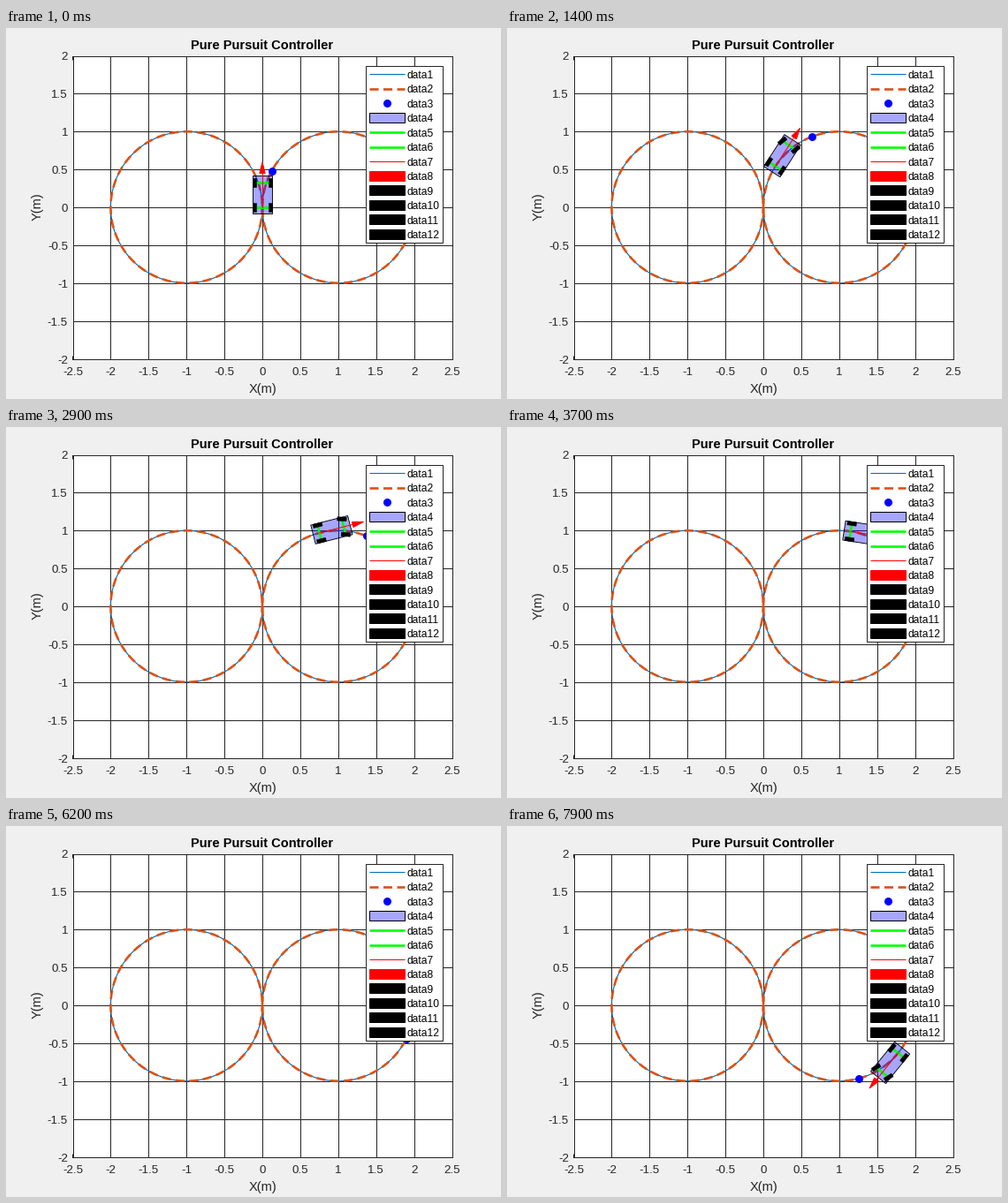
These frames come from a looping animation (560 px wide and 420 px high, 8000 ms). A matplotlib script:

```python
import numpy as np
import matplotlib.pyplot as plt
from matplotlib.animation import FuncAnimation
from matplotlib.patches import Polygon, Rectangle

W, H, DPI = 560, 420, 100
PX = 72 / DPI                       # one pixel in points
FRAMES, INTERVAL = 80, 100
LEFT, RIGHT, TOP, BOTTOM = 75.5, 504.5, 31.5, 374.5

INK = (0.15, 0.15, 0.15)
BLUE, ORANGE = (0, 0.447, 0.741), (0.85, 0.325, 0.098)
GREEN, RED = (0, 1, 0), (1, 0, 0)
BODY, BODY_OPAQUE = (0, 0, 1, 0.35), (0.65, 0.65, 1)
DASH = (0, (3.75, 2.06))

STEP, LOOKAHEAD, LAG = 0.05, 0.5, 2.54   # metres per frame, metres, frames
WHEELBASE, TRACK = 0.33, 0.105
REAR, FRONT, HALF_WIDTH = -0.087, 0.415, 0.128
WHEEL_L, WHEEL_W = 0.12, 0.05
ARROW, HEAD_L, HEAD_W = 0.6, 0.15, 0.075
STEER = -np.arctan(WHEELBASE)

plt.rcParams["font.family"] = "Liberation Sans"
fig = plt.figure(figsize=(W / DPI, H / DPI), dpi=DPI, facecolor=(0.94,) * 3)
ax = fig.add_axes([LEFT / W, 1 - BOTTOM / H, (RIGHT - LEFT) / W, (BOTTOM - TOP) / H])
ax.set(xlim=(-2.5, 2.5), ylim=(-2, 2))
top = fig.add_axes([0, 0, 1, 1], zorder=5)
top.set(xlim=(0, W), ylim=(H, 0))
top.axis("off")


def label(x, y, s, size, **kw):
    kw.setdefault("ha", "center")
    top.text(x, y, s, fontsize=size * PX, va="baseline", **kw)


def draw_axes():
    xs, ys = np.linspace(-2.5, 2.5, 11), np.linspace(-2, 2, 9)
    ax.set_xticks(xs, [""] * len(xs))
    ax.set_yticks(ys, [""] * len(ys))
    ax.tick_params(direction="in", length=4 * PX, width=PX, color=INK,
                   top=True, right=True)
    ax.grid(color=(0.15, 0.15, 0.15, 0.16), linewidth=PX)
    ax.set_axisbelow(True)
    for side in ax.spines.values():
        side.set(color=INK, linewidth=PX)
    for x in xs:
        label(np.interp(x, (-2.5, 2.5), (LEFT, RIGHT)), 393, f"{x:g}", 13.33, color=INK)
    for y in ys:
        label(70, np.interp(y, (-2, 2), (BOTTOM, TOP)) + 5, f"{y:g}", 13.33,
              ha="right", color=INK)
    label(290, 24, "Pure Pursuit Controller", 14.67, weight="bold", color="black")
    label(290.5, 413, "X(m)", 14.67, color=INK)
    label(40, 202, "Y(m)", 14.67, color=INK, rotation=90, rotation_mode="anchor")


def draw_legend():
    x0, x1 = 411, 451
    top.add_patch(Rectangle((406.5, 42.5), 87, 200, facecolor="white",
                            edgecolor=INK, linewidth=PX))

    def line(y, **kw):
        top.plot([x0, x1], [y, y], solid_capstyle="butt", dash_capstyle="butt", **kw)

    def swatch(y, face, edge):
        top.add_patch(Rectangle((x0 - 0.5, y - 5.5), x1 - x0, 11, facecolor=face,
                                edgecolor=edge, linewidth=PX))

    rows = 52.3 + 16.45 * np.arange(12)
    line(rows[0], color=BLUE, linewidth=1.1 * PX)
    line(rows[1], color=ORANGE, linewidth=2.67 * PX, linestyle=DASH)
    top.plot(430.5, rows[2], "o", color="blue", markersize=9 * PX, markeredgewidth=0)
    swatch(rows[3], BODY_OPAQUE, "black")
    line(rows[4], color=GREEN, linewidth=2.67 * PX)
    line(rows[5], color=GREEN, linewidth=2.67 * PX)
    line(rows[6], color=RED, linewidth=PX)
    swatch(rows[7], RED, RED)
    for y in rows[8:]:
        swatch(y, "black", "black")
    for i, y in enumerate(rows, 1):
        label(453, y + 4.7, f"data{i}", 12, ha="left", color="black")


def rotate(pts, a):
    c, s = np.cos(a), np.sin(a)
    return np.asarray(pts) @ np.array([[c, s], [-s, c]])


def box(x0, x1, half):
    return np.array([(x0, -half), (x1, -half), (x1, half), (x0, half)])


def on_path(s):
    return np.array([1 - np.cos(s), np.sin(s)])


def patch(z, face, edge):
    p = Polygon(np.zeros((4, 2)), closed=True, facecolor=face, edgecolor=edge,
                linewidth=0.9 * PX, zorder=z, joinstyle="miter")
    return ax.add_patch(p)


draw_axes()
draw_legend()

# figure eight: right loop, then left loop
s = np.linspace(0, 2 * np.pi, 400)
right = on_path(s)
path = np.hstack([right, right * [[-1], [1]]])
ax.plot(*path, color=BLUE, linewidth=1.2 * PX, zorder=2)
ax.plot(*path, color=ORANGE, linewidth=2.67 * PX, linestyle=DASH,
        dash_capstyle="butt", zorder=2.1)

goal, = ax.plot([], [], "o", color="blue", markersize=9 * PX, markeredgewidth=0, zorder=3)
body = patch(4, BODY, "black")
axles = [ax.plot([], [], color=GREEN, linewidth=2.67 * PX, zorder=5,
                 solid_capstyle="butt")[0] for _ in range(2)]
shaft, = ax.plot([], [], color=RED, linewidth=PX, zorder=6)
head = patch(6, RED, RED)
wheels = [patch(7, "black", "black") for _ in range(4)]
for w in wheels:
    w.set_linewidth(0.5 * PX)


def update(n):
    # the car speeds up from rest, then holds a steady pace
    arc = STEP * (n - LAG * (1 - np.exp(-n / LAG)))
    pos, heading = on_path(arc), np.pi / 2 - arc
    steer = STEER if n else 0

    def place(pts):
        return rotate(pts, heading) + pos

    x, y = on_path(LOOKAHEAD + STEP * n)
    goal.set_data([x], [y])
    body.set_xy(place(box(REAR, FRONT, HALF_WIDTH)))
    for axle, d in zip(axles, (0, WHEELBASE)):
        axle.set_data(*place([(d, -TRACK), (d, TRACK)]).T)
    neck = ARROW - HEAD_L
    shaft.set_data(*place([(0, 0), (neck, 0)]).T)
    head.set_xy(place([(ARROW, 0), (neck, HEAD_W / 2), (neck, -HEAD_W / 2)]))

    tyre = box(-WHEEL_L / 2, WHEEL_L / 2, WHEEL_W / 2)
    mounts = [(d, side, a) for d, a in ((0, 0), (WHEELBASE, steer))
              for side in (-TRACK, TRACK)]
    for w, (d, side, a) in zip(wheels, mounts):
        w.set_xy(place(rotate(tyre, a) + (d, side)))
    return [goal, body, *axles, shaft, head, *wheels]


anim = FuncAnimation(fig, update, frames=FRAMES, init_func=lambda: update(0),
                     interval=INTERVAL, repeat=True, repeat_delay=0, blit=False)
plt.show()
```
